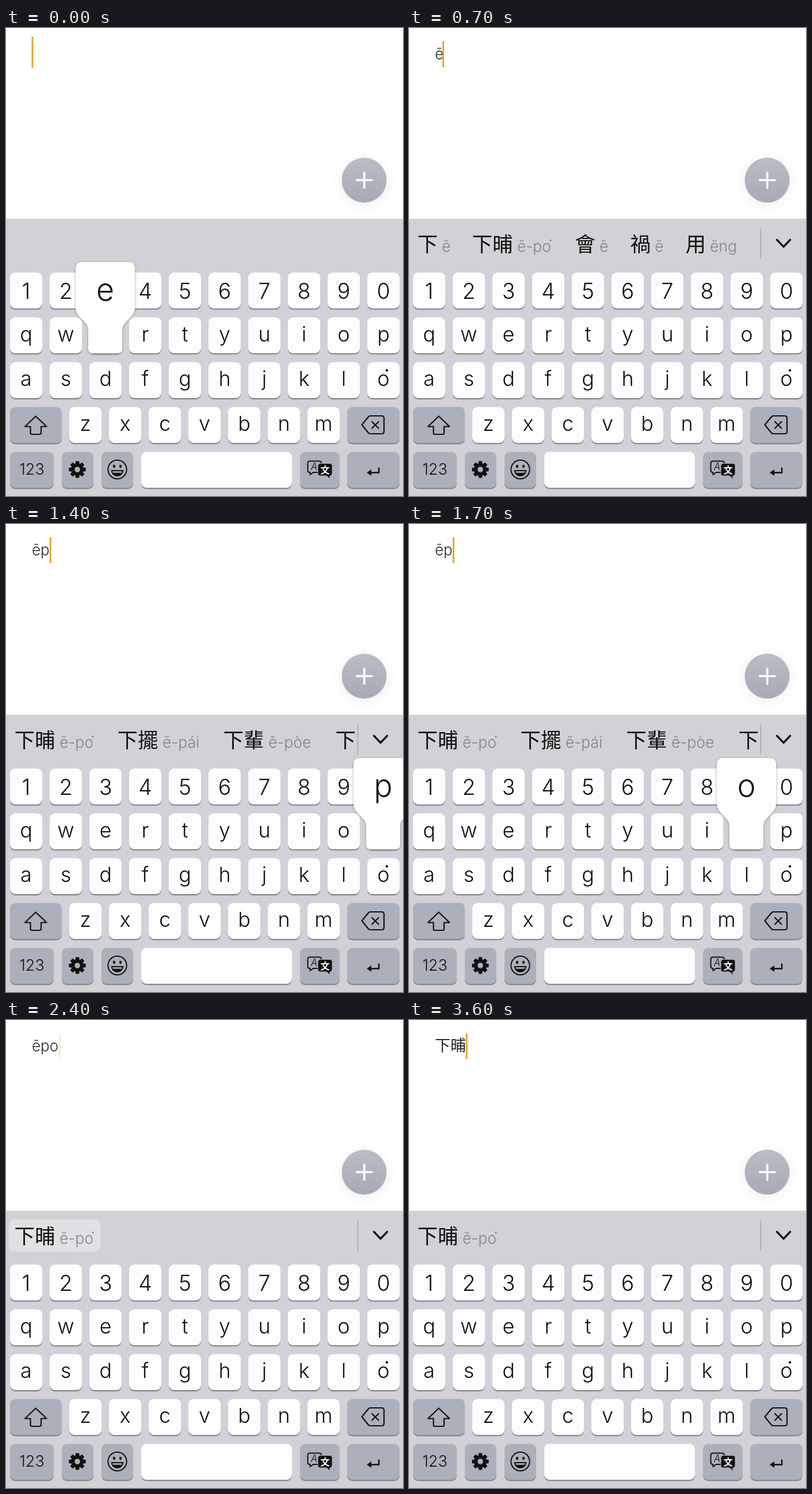
Recreate the animation shown at these times as an HTML page. Size 690x812 px, loop 3.7 s.

```html
<!DOCTYPE html>
<html lang="en">
<head>
<meta charset="utf-8">
<title>Keyboard input</title>
<style>
html, body { margin: 0; width: 100%; height: 100%; overflow: hidden; background: #fff; }
svg { display: block; width: 690px; height: 812px; }
text { font-family: Inter, 'Noto Sans', sans-serif; font-weight: 350; fill: #111; }
.han { font-family: 'Noto Sans CJK TC', 'Noto Sans CJK SC', 'Noto Sans CJK JP', 'Noto Sans CJK', sans-serif; font-weight: 400; }
.mid { text-anchor: middle; }
.big { font-weight: 300; }
.line { fill: none; stroke: #111; stroke-width: 2.2; stroke-linecap: round; stroke-linejoin: round; }
</style>
</head>
<body>
<svg id="stage" viewBox="0 0 690 812">
  <defs>
    <linearGradient id="fab" x1="0" y1="0" x2="0" y2="1">
      <stop offset="0" stop-color="#babdc6"/><stop offset="1" stop-color="#a7aab4"/>
    </linearGradient>
    <filter id="soft" x="-50%" y="-50%" width="200%" height="200%"><feGaussianBlur stdDeviation="13"/></filter>
    <filter id="lift" x="-20%" y="-20%" width="140%" height="140%">
      <feDropShadow dx="0" dy="1" stdDeviation="2" flood-color="#000" flood-opacity=".32"/>
    </filter>
    <clipPath id="clip"><rect y="331" width="611" height="93"/></clipPath>
  </defs>
  <rect width="690" height="812" fill="#fff"/>
  <circle cx="622.5" cy="268" r="38" fill="#8a86a8" opacity=".16" filter="url(#soft)"/>
  <circle cx="622.5" cy="264" r="39" fill="url(#fab)"/>
  <path d="M609.5 264H636M622.7 251V277.500" stroke="#fff" stroke-width="3.600" stroke-linecap="round"/>
  <rect y="331" width="690" height="481" fill="#d1d1d6"/>
  <g id="keys"></g>
  <g id="icons">
    <path class="line" d="M51.700 673.500L33 691.500H42.500V702.500Q42.500 705 45 705H58.500Q61 705 61 702.500V691.500H70.500Z"/>
    <path class="line" d="M618.500 688.500L629.500 675Q631 673 633.500 673H653Q657 673 657 677V700Q657 704 653 704H633.500Q631 704 629.500 702Z"/>
    <path class="line" d="M636 683L647.500 694.500M647.500 683L636 694.500"/>
    <circle cx="193.500" cy="766" r="16.200" class="line" style="stroke-width:2"/>
    <ellipse cx="188" cy="760.500" rx="1.900" ry="2.800"/><ellipse cx="199" cy="760.500" rx="1.900" ry="2.800"/>
    <path d="M182.500 767H204.500Q203 778 193.500 778T182.500 767Z" fill="#111"/>
    <path d="M185 769H202L201 771.800H186Z" fill="#acb0ba"/>
    <path class="line" style="stroke-width:2" d="M528 751.500H544Q548 751.500 548 755.500V768Q548 771 544.500 771H534L528.500 775V771Q524.500 771 524.500 767.500V755Q524.500 751.500 528 751.500Z"/>
    <text class="mid" x="535.500" y="767" font-size="17" font-style="italic">A</text>
    <path d="M546 755.500H563Q567 755.500 567 759.500V773Q567 777 563 777V782L557 777H546Q542 777 542 773V759.500Q542 755.500 546 755.500Z" fill="#111" stroke="#acb0ba" stroke-width="1"/>
    <text class="mid han" x="554.500" y="772.500" font-size="16" style="fill:#fff;font-weight:700">文</text>
    <path class="line" style="stroke-width:2.500" d="M648 763.500V771.500H630"/>
    <path d="M627 771.500L635 766V777Z" fill="#111"/>
  </g>
  <g id="bar">
    <path d="M611.500 348V400" stroke="#a3a3a9" stroke-width="1.500"/>
    <path class="line" style="stroke-width:3.300" d="M639.500 367.500L651 379.500L662.500 367.500"/>
    <rect id="press" x="5" y="346" width="159" height="56" rx="10" fill="#e1e1e4"/>
    <g id="list" clip-path="url(#clip)"></g>
  </g>
  <g id="popup"></g>
  <text id="typed" x="45" y="54" style="fill:#2c2c30"></text>
  <rect id="caret" width="3" fill="#dfab2c"/>
</svg>
<script>
const NS = 'http://www.w3.org/2000/svg';
const $ = id => document.getElementById(id);
const rowY = r => 424.2 + 77.8 * r;
const DOT = '\u02d9'; // marks an o with a dot at its upper right

function add(parent, tag, attrs, text) {
  const el = document.createElementNS(NS, tag);
  for (const k in attrs) el.setAttribute(k, attrs[k]);
  if (text) el.textContent = text;
  parent.appendChild(el);
  return el;
}

function key(x, y, w, fill) {
  const box = { x, width: w, height: 62.3, rx: 9 };
  add($('keys'), 'rect', { ...box, y: y + 2.3, fill: '#898a8e' });
  add($('keys'), 'rect', { ...box, y, fill });
}

function label(parent, x, y, size, text, cls = 'mid') {
  add(parent, 'text', { class: cls, x, y, 'font-size': size }, text);
}

const spots = {};
['1234567890', 'qwertyuiop', 'asdfghjklo', 'zxcvbnm'].forEach((row, r) => {
  [...row].forEach((ch, i) => {
    const x = (r === 3 ? 110 : 7) + 69 * i, y = rowY(r);
    key(x, y, 56, '#fdfdff');
    label($('keys'), x + 28, y + (r ? 41.5 : 45.3), r ? 36 : 37.5, ch);
    if (!spots[ch]) spots[ch] = { x: x + 27.5, y };
  });
});
add($('keys'), 'circle', { cx: 662, cy: 594, r: 2.2, fill: '#111' });

[[7, 3, 90], [593, 3, 91], [7, 4, 76], [97, 4, 55], [166, 4, 55], [511, 4, 69], [593, 4, 91]]
  .forEach(([x, r, w]) => key(x, rowY(r), w, '#acb0ba'));
key(235, rowY(4), 262, '#fdfdff');
label($('keys'), 45, 775, 27, '123');

// Gear: a toothed ring around a hole
let gear = '';
for (let i = 0; i < 8; i++) {
  [[-.29, 10.5], [-.19, 14.3], [.19, 14.3], [.29, 10.5]].forEach(([da, r]) => {
    const a = i * Math.PI / 4 + da;
    gear += (gear ? 'L' : 'M') + (124 + r * Math.cos(a)).toFixed(2) + ' ' + (766 + r * Math.sin(a)).toFixed(2);
  });
}
add($('icons'), 'path', { d: gear + 'Z', fill: '#111', stroke: '#111', 'stroke-linejoin': 'round' });
add($('icons'), 'circle', { cx: 124, cy: 766, r: 4.8, fill: '#acb0ba' });

const LISTS = {
  none: [],
  e: [[16, '的', 'ê'], [111, '下', 'e'], [207, '下', 'ē'], [302, '个', 'ê'], [397, '往', 'éng'], [525, '挨', 'e']],
  tone: [[16, '下', 'ē'], [111, '下晡', 'ē-po' + DOT], [290, '會', 'ē'], [386, '禍', 'ē'], [482, '用', 'ēng']],
  p: [[16, '下晡', 'ē-po' + DOT], [195, '下擺', 'ē-pái'], [379, '下輩', 'ē-pòe'], [574, '下', '']],
  po: [[16, '下晡', 'ē-po' + DOT]]
};

const STATES = [
  { at: 0, text: '', x: 44.5, list: 'none', tap: 0 },
  { at: 100, text: 'e', x: 58, list: 'e', tap: 100 },
  { at: 700, text: 'ē', x: 58, list: 'tone', tap: 650 },
  { at: 1400, text: 'ēp', x: 75.8, list: 'p', tap: 1400 },
  { at: 1800, text: 'ēpo', x: 92, list: 'po', tap: 1800 },
  { at: 2500, text: '下晡', x: 98.7, list: 'po', tap: 2450 }
];

// [key, shown from, shown until]
const TAPS = [['e', 0, 200], ['7', 600, 700], ['p', 1300, 1500], ['o', 1700, 1900]];

function drawList(name) {
  const g = $('list');
  g.replaceChildren();
  $('bar').setAttribute('visibility', LISTS[name].length ? 'visible' : 'hidden');
  for (const [x, han, sound] of LISTS[name]) {
    add(g, 'text', { class: 'han', x: x - 1.5, y: 388, 'font-size': 35.5 }, han);
    const sx = x + 36 * han.length + 5;
    add(g, 'text', { x: sx, y: 388, 'font-size': 26.5, style: 'fill:#838389' }, sound.replace(DOT, ''));
    if (sound.endsWith(DOT)) add(g, 'circle', { cx: sx + 58, cy: 368.5, r: 1.6, fill: '#838389' });
  }
}

function drawPopup(ch) {
  const g = $('popup');
  g.replaceChildren();
  if (!ch) return;
  const { x, y } = spots[ch];
  const d = 'M-40 -96Q-51.5 -96 -51.5 -84V-18C-51.5 -5 -43 0 -37 7S-29.5 14 -29.5 24V54Q-29.5 62.5 -20.5 62.5' +
    'H20.5Q29.5 62.5 29.5 54V24C29.5 14 43 14 37 7C43 0 51.5 -5 51.5 -18V-84Q51.5 -96 40 -96Z';
  add(g, 'path', {
    d: d.replace('14 43 14 37 7', '14 31 14 37 7'),
    transform: `translate(${x} ${y})`, fill: '#fefefe', filter: 'url(#lift)'
  });
  label(g, x, y - 29.3, 54, ch, 'mid big');
}

function caretAlpha(age) {
  const clamp = v => Math.max(0, Math.min(1, v));
  return clamp(1 - (age - 450) / 200) + clamp((age - 900) / 200);
}

let shownList, shownKey;
function render(ms) {
  const t = Math.floor(ms % 3700 / 100) * 100;
  const s = STATES.filter(v => v.at <= t).pop();
  const tap = TAPS.find(v => t >= v[1] && t < v[2]);
  const ch = tap ? tap[0] : '';
  if (s.list !== shownList) drawList(shownList = s.list);
  if (ch !== shownKey) drawPopup(shownKey = ch);

  const han = s.text === '下晡';
  $('typed').textContent = s.text;
  $('typed').setAttribute('class', han ? 'han' : '');
  $('typed').setAttribute('font-size', han ? 27 : 26);
  $('press').setAttribute('opacity', t === 2400 ? 1 : 0);

  const caret = $('caret');
  caret.setAttribute('x', s.x);
  caret.setAttribute('y', s.text ? 23 : 15);
  caret.setAttribute('height', s.text ? 45 : 54);
  caret.setAttribute('opacity', caretAlpha(t - s.tap));
}

const start = performance.now();
function tick() {
  render(performance.now() - start);
  requestAnimationFrame(tick);
}
tick();
</script>
</body>
</html>
```
